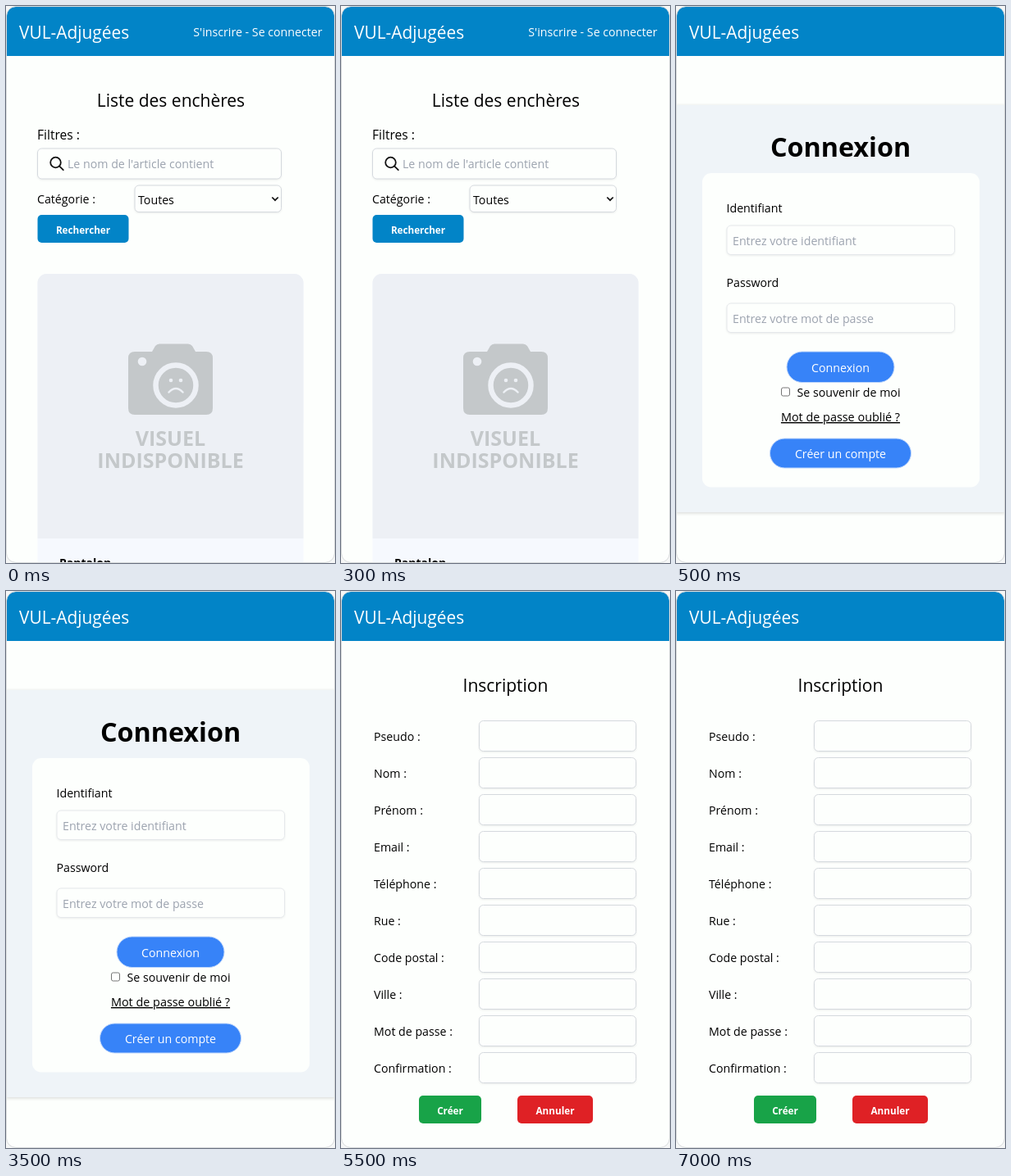
Animation of 401x680 px, one loop 8 s. Source, as an HTML page:

```html
<!DOCTYPE html>
<html lang="fr">
<head>
<meta charset="utf-8">
<title>Enchères</title>
<style>
  html, body { margin: 0; width: 100%; height: 100%; overflow: hidden; background: #f6f7f7; }
  svg { display: block; }
  text { font: 14.2px "Open Sans", "Noto Sans", sans-serif; fill: #000; }
  .title { font-size: 21px; }
  .brand { font-size: 20.9px; }
  .mid { text-anchor: middle; }
  .end { text-anchor: end; }
  .white { fill: #fff; }
  .hint { fill: #9ca3af; }
  .button { font-size: 11.7px; font-weight: 700; fill: #fff; }
  .notice { font-size: 25px; font-weight: 700; fill: #c4c8ca; }
  .field { fill: #fdfffd; stroke: #d5d9de; filter: drop-shadow(0 1px 1px rgba(0, 0, 0, .07)); }
  .pale { stroke: #e5e8eb; }
  .pill { fill: #3783f8; stroke: #bcd5fb; }
</style>
</head>
<body>
<svg width="401" height="680" viewBox="0 0 401 680">
  <clipPath id="card"><rect x="1" y="1" width="399" height="678" rx="11"/></clipPath>
  <g clip-path="url(#card)">
    <rect width="401" height="680" fill="#fdfffd"/>
    <rect width="401" height="61" fill="#0284c7"/>
    <text class="brand white" x="16" y="40">VUL-Adjugées</text>

    <g class="screen">
      <text class="end white" x="385.5" y="37">S'inscrire - Se connecter</text>
      <text class="title mid" x="201" y="123">Liste des enchères</text>
      <text x="38" y="163" style="font-size:15.6px">Filtres :</text>
      <rect class="field" x="38.5" y="174" width="297" height="37" rx="5"/>
      <g fill="none" stroke="#111" stroke-width="1.8" stroke-linecap="round">
        <circle cx="60.5" cy="191" r="6.3"/>
        <path d="M65.2 195.7L69.8 200.2"/>
      </g>
      <text class="hint" x="75" y="198">Le nom de l'article contient</text>
      <text x="38" y="241">Catégorie :</text>
      <rect class="field" x="157" y="219" width="178.5" height="32.5" rx="5"/>
      <text x="161" y="242">Toutes</text>
      <path d="M324.3 233.5l3.7 3.7 3.7-3.7" fill="none" stroke="#111" stroke-width="1.7"/>
      <rect x="38.5" y="255" width="111" height="34" rx="5" fill="#0284c7"/>
      <text class="button mid" x="94" y="277.5">Rechercher</text>

      <path d="M38.500 680V338a11 11 0 0 1 11-11H351.500a11 11 0 0 1 11 11V680z" fill="#f6f9fe"/>
      <path d="M38.500 650V338a11 11 0 0 1 11-11H351.500a11 11 0 0 1 11 11V650z" fill="#edf0f5"/>
      <path d="M157 422H178L182 415Q184 412.500 187 412.500H222Q225 412.500 227 415L231 422H244Q252 422 252 430V491Q252 499 244 499H157Q149 499 149 491V430Q149 422 157 422z" fill="#c4c8ca"/>
      <circle cx="166" cy="434" r="5.3" fill="#edf0f5"/>
      <circle cx="207" cy="463" r="24.5" fill="none" stroke="#edf0f5" stroke-width="6.5"/>
      <g fill="#edf0f5">
        <circle cx="201" cy="457" r="2.3"/>
        <circle cx="213" cy="457" r="2.3"/>
      </g>
      <path d="M198.500 471.500Q207 462.500 215.500 471.500" fill="none" stroke="#edf0f5" stroke-width="2.5" stroke-linecap="round"/>
      <text class="notice mid" x="200.500" y="537">VISUEL</text>
      <text class="notice mid" x="200.500" y="564">INDISPONIBLE</text>
      <text x="65" y="685" style="font-weight:700;font-size:14px">Pantalon</text>
    </g>

    <g class="screen">
      <rect y="121" width="401" height="497" fill="#eff4f8" style="filter:drop-shadow(0 1px 2px rgba(0,0,0,.16))"/>
      <text class="mid" x="200.5" y="184" style="font-size:32.3px;font-weight:700">Connexion</text>
      <rect x="32" y="204" width="338" height="383.5" rx="11" fill="#fdfffd"/>
      <text x="61.5" y="252">Identifiant</text>
      <rect class="field pale" x="62" y="268" width="277.5" height="35.5" rx="5"/>
      <text class="hint" x="69" y="292">Entrez votre identifiant</text>
      <text x="61.5" y="343">Password</text>
      <rect class="field pale" x="62" y="363" width="277.5" height="35.5" rx="5"/>
      <text class="hint" x="69" y="387">Entrez votre mot de passe</text>
      <rect class="pill" x="135" y="422" width="131" height="37.5" rx="18.75"/>
      <text class="mid white" x="200.5" y="447">Connexion</text>
      <rect x="128.5" y="466" width="10" height="10" rx="2" fill="#fff" stroke="#767676"/>
      <text x="147.5" y="477">Se souvenir de moi</text>
      <text class="mid" x="200.5" y="507" style="font-size:14.4px;text-decoration:underline">Mot de passe oublié ?</text>
      <rect class="pill" x="114.5" y="528" width="172" height="36" rx="18"/>
      <text class="mid white" x="200.5" y="552">Créer un compte</text>
    </g>

    <g class="screen">
      <text class="title mid" x="200.5" y="123">Inscription</text>
      <g id="form"></g>
      <rect x="95" y="616" width="76" height="34" rx="5" fill="#18a348"/>
      <text class="button mid" x="133" y="639">Créer</text>
      <rect x="215" y="616" width="92" height="34" rx="5" fill="#df2125"/>
      <text class="button mid" x="261" y="639">Annuler</text>
    </g>
  </g>
  <rect x=".5" y=".5" width="400" height="679" rx="11.5" fill="none" stroke="#d9dcdd"/>
</svg>
<script>
  const labels = ["Pseudo", "Nom", "Prénom", "Email", "Téléphone", "Rue",
    "Code postal", "Ville", "Mot de passe", "Confirmation"];
  document.getElementById("form").innerHTML = labels.map((label, i) => `
    <text x="40" y="${183 + 45 * i}">${label} :</text>
    <rect class="field" x="168.5" y="${158.5 + 45 * i}" width="191" height="37" rx="5"/>`).join("");

  const LOOP = 8000;
  const starts = [0, 500, 5500];
  const screens = document.querySelectorAll(".screen");

  function draw() {
    const time = performance.now() % LOOP;
    const current = starts.filter(start => time >= start).length - 1;
    screens.forEach((screen, i) => { screen.style.display = i === current ? "" : "none"; });
    requestAnimationFrame(draw);
  }
  draw();
</script>
</body>
</html>
```
